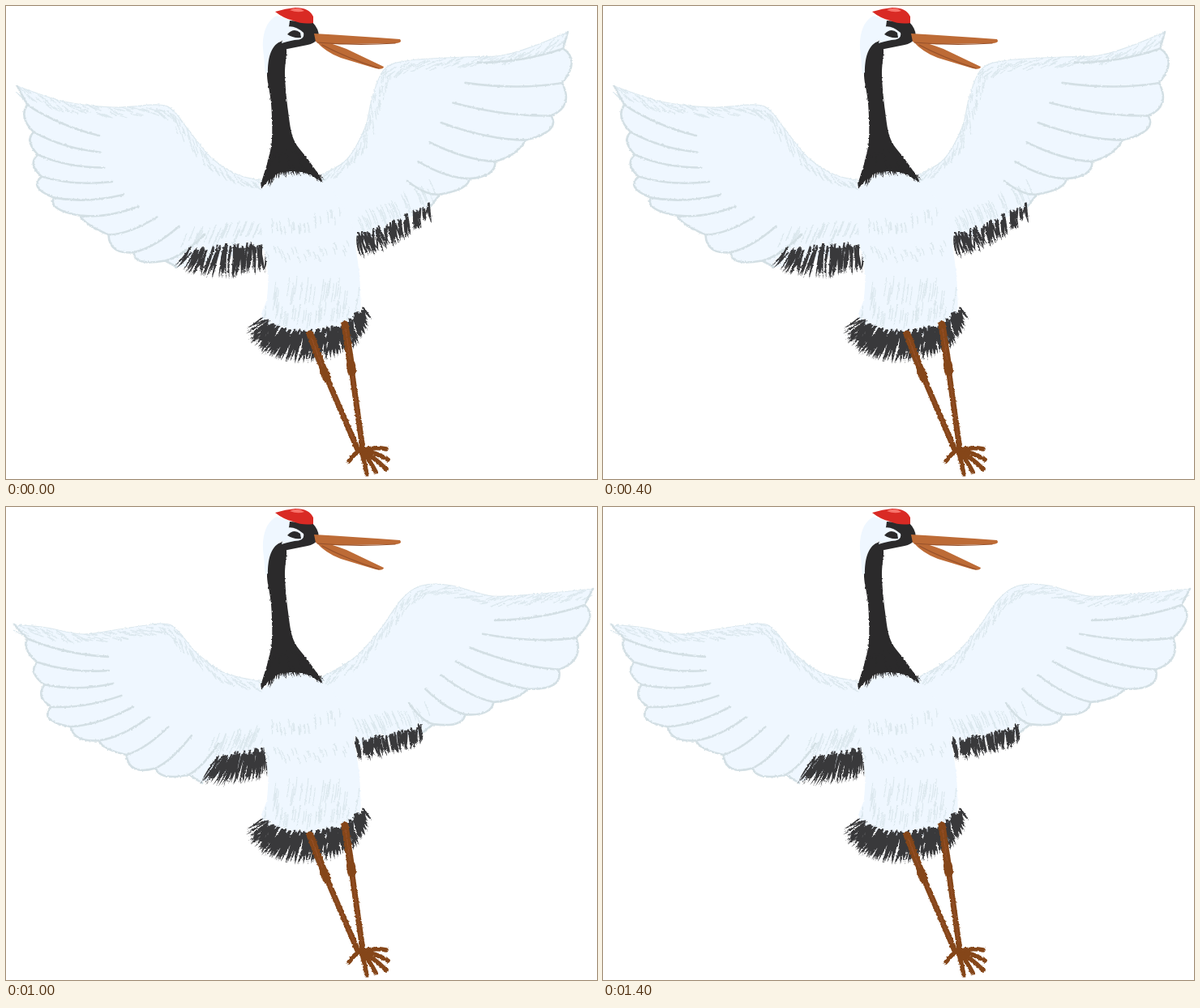
An HTML page that plays this animation: 729 by 584 pixels, repeating every 1.6 s.

```html
<!DOCTYPE html>
<html>
<head>
<meta charset="utf-8">
<title>Crane</title>
<style>
html, body { margin: 0; width: 100%; height: 100%; overflow: hidden; background: #fff; }
svg { display: block; width: 100vw; height: 100vh; }
path { fill: none; stroke-linecap: round; stroke-linejoin: round; }
.white { fill: #eff7ff; }
.line { stroke: #d3dfe4; stroke-width: 2.6; }
.soft { stroke: #dce8ee; stroke-width: 1.2; }
.dark { fill: #39393b; }
.black { fill: #2b2a2b; }
.leg { stroke: #854619; }
.red { fill: #d92a24; }
.pink { fill: #f8736b; }
.beak { fill: #bd6b36; }
.edge { stroke: #96502a; stroke-width: 1.2; }
</style>
</head>
<body>
<svg viewBox="0 0 729 584">
<filter id="rough" filterUnits="userSpaceOnUse" x="0" y="0" width="729" height="584" color-interpolation-filters="sRGB">
  <feTurbulence type="fractalNoise" baseFrequency=".4" seed="4"/>
  <feDisplacementMap in="SourceGraphic" scale="3" xChannelSelector="R" yChannelSelector="G"/>
</filter>
<g filter="url(#rough)">
  <g id="up"></g>
  <g id="down"></g>
  <g id="body"></g>
  <g id="legs"></g>
</g>
<g id="head">
  <path class="white" d="M334 12C321 18 316 35 317 52L320 84L323 82C323 66 326 50 338 44Q346 38 350 30L350 17Z"/>
  <path class="black" d="M350 18L378 20Q386 28 386 38Q382 46 372 48L342 54L336 46Q348 40 350 18Z"/>
  <path class="white" d="M345 26Q356 23 367 33Q369 42 356 42Q346 44 340 46Z"/>
  <path class="black" d="M347 35Q355 26 363 33L364 39Q354 40 347 35Z"/>
  <path class="red" d="M332 7Q345 3 357 2Q374 2 379 13L379 21Q366 23 354 18Q342 15 332 7Z"/>
  <path class="pink" d="M350 5Q360 0 368 6Q360 9 350 5Z"/>
  <path class="beak" d="M382 43Q400 45 420 53L466 75Q465 79 456 77L413 64Q394 57 382 43Z"/>
  <path class="beak" d="M380 34Q430 37 486 41Q490 46 478 46L420 47Q395 48 382 44Z"/>
  <path class="edge" d="M384 45Q430 49 480 46M390 48Q420 64 460 77"/>
</g>
</svg>
<script>
let seed = 7;
const rand = () => (seed = seed * 16807 % 2147483647) / 2147483647;
const jitter = r => (rand() - .5) * 2 * r;
const $ = id => document.getElementById(id);

const points = a => a.flatMap((x, i) => i % 2 ? [] : [[x, a[i + 1]]]);
const mix = (a, b, t) => a.map((v, i) => v + (b[i] - v) * t);
const gap = (a, b) => Math.hypot(b[0] - a[0], b[1] - a[1]);

// Point at t on a Bezier curve of any degree.
function at(curve, t) {
  let p = points(curve);
  while (p.length > 1) p = p.slice(1).map((q, i) => mix(p[i], q, t));
  return p[0];
}

// Smooth line through key points.
function smooth(list, closed) {
  const p = points(list), n = p.length;
  const get = i => closed ? p[(i + n) % n] : p[Math.max(0, Math.min(n - 1, i))];
  let d = 'M' + p[0];
  for (let i = 0; i < (closed ? n : n - 1); i++) {
    const [a, b, c, e] = [-1, 0, 1, 2].map(k => get(i + k));
    d += `C${b.map((v, k) => v + (c[k] - a[k]) / 6)} ${c.map((v, k) => v - (e[k] - b[k]) / 6)} ${c}`;
  }
  return d;
}

// Tapered hairs running from one curve to another.
function fringe(top, bottom, n, w = 2) {
  let d = '';
  for (let i = 0; i < n; i++) {
    const t = (i + rand()) / n;
    const [x, y] = at(top, t).map(v => v + jitter(4));
    const [ex, ey] = at(bottom, t).map(v => v + jitter(4));
    const mx = (x + ex) / 2 + jitter(3), my = (y + ey) / 2 + 3;
    d += `M${x} ${y}Q${mx - w} ${my} ${ex} ${ey}Q${mx + w} ${my} ${x + w} ${y}Z`;
  }
  return d;
}

// Short strokes scattered along a curve.
function hatch(curve, n, dx, dy, spread = 6) {
  let d = '';
  for (let i = 0; i < n; i++) {
    const [x, y] = at(curve, (i + rand()) / n).map(v => v + jitter(spread));
    d += `M${x} ${y}q${dx / 2 + 1} ${dy / 2 - 1} ${dx} ${dy}`;
  }
  return d;
}

function add(parent, cls, d, width) {
  const p = document.createElementNS('http://www.w3.org/2000/svg', 'path');
  p.setAttribute('class', cls);
  p.setAttribute('d', d);
  if (width) p.setAttribute('stroke-width', width);
  $(parent).append(p);
}

// lead: front edge from shoulder to wing tip; tips: feather ends;
// inner: where the feather lines stop; top and hem: bounds of the dark fringe.
function wing(pose, side, { lead, tips, inner, top, hem }) {
  const ends = points(tips), front = points(lead), last = ends.length - 1;
  const edge = smooth(lead);
  let lobes = '', lines = '', shade = '';
  let prev = ends[0];
  for (let i = 0; i < last; i++) {
    const a = ends[i], b = ends[i + 1];
    const stop = at(inner, i / (last - 1)), mid = mix(a, b, .5);
    const notch = mix(mid, stop, Math.min(9, gap(a, b) * .3) / gap(mid, stop));
    const chord = mix(prev, notch, .5);
    lobes += `Q${i ? mix(chord, a, 1.8) : chord} ${notch}`;
    const bend = mix(notch, stop, .45);
    lines += `M${notch}Q${bend[0]} ${bend[1] + 9} ${stop}`;
    prev = notch;
  }
  lobes += `L${ends[last]}`;

  front.slice(1).forEach((b, i) => {
    const a = front[i], len = gap(a, b);
    const [ux, uy] = [(b[0] - a[0]) / len, (b[1] - a[1]) / len];
    for (let s = 0; s < len; s += 2.5) {
      const depth = rand() * 11;
      const x = a[0] + ux * s - side * uy * depth, y = a[1] + uy * s + side * ux * depth;
      shade += `M${x} ${y}l${-ux * 8 - side * uy * 3} ${-uy * 8 + side * ux * 3}`;
    }
  });
  const above = top.map((v, i) => i % 2 ? v - 24 : v);
  shade += hatch(above, 32, 7 * side, 17);

  add(pose, 'white', `${edge}${lobes}L${375 + side * 50} 300Z`);
  add(pose, 'soft', edge + shade);
  add(pose, 'line', `M${ends[0]}${lobes}${lines}`);
  add(pose, 'dark', fringe(top, hem, 58));
}

wing('up', -1, {
  lead: [318, 216, 285, 208, 253, 187, 225, 153, 207, 130, 188, 122, 132, 125, 72, 118, 14, 99],
  tips: [14, 99, 22, 138, 29, 168, 33, 196, 38, 224, 62, 250, 102, 270, 134, 301, 166, 316, 212, 323],
  inner: [115, 160, 110, 245, 245, 282],
  top: [226, 300, 270, 298, 319, 293],
  hem: [211, 323, 265, 344, 320, 326]
});
wing('up', 1, {
  lead: [388, 209, 420, 190, 443, 150, 452, 112, 468, 77, 500, 67, 565, 63, 612, 61, 655, 48, 693, 32],
  tips: [693, 32, 699, 70, 691, 120, 672, 153, 627, 182, 597, 207, 563, 225, 524, 247],
  inner: [582, 70, 535, 145, 495, 216],
  top: [431, 284, 475, 272, 522, 244],
  hem: [440, 310, 480, 297, 524, 264]
});
wing('down', -1, {
  lead: [318, 216, 270, 205, 235, 180, 212, 153, 193, 144, 140, 151, 95, 157, 50, 149, 10, 145],
  tips: [10, 145, 25, 176, 34, 205, 43, 234, 52, 262, 90, 286, 124, 298, 158, 324, 197, 333, 242, 341],
  inner: [126, 185, 120, 255, 262, 292],
  top: [262, 310, 290, 304, 319, 298],
  hem: [240, 341, 285, 346, 320, 330]
});
wing('down', 1, {
  lead: [388, 211, 430, 186, 461, 152, 488, 114, 513, 97, 550, 97, 600, 110, 660, 107, 724, 101],
  tips: [724, 101, 721, 138, 704, 186, 677, 220, 627, 236, 592, 254, 556, 268, 512, 280],
  inner: [603, 140, 560, 190, 497, 242],
  top: [432, 288, 470, 286, 510, 270],
  hem: [437, 312, 475, 308, 513, 290]
});

add('body', 'white', smooth([315, 228, 313, 255, 317, 290, 323, 330, 322, 360, 318, 390, 372, 408,
  430, 392, 437, 350, 430, 290, 422, 258, 391, 216, 350, 203], true));
add('body', 'soft',
  hatch([325, 265, 360, 275, 412, 252], 28, 1, 10) +
  hatch([322, 300, 370, 310, 425, 292], 24, 3, 8) +
  hatch([330, 350, 375, 335, 430, 345], 28, -3, 22, 9) +
  hatch([326, 372, 375, 382, 430, 362], 32, -2, 16, 7));
add('body', 'dark', fringe([318, 386, 335, 412, 425, 407, 437, 374],
  [298, 398, 305, 458, 440, 450, 448, 386], 150, 2.5));
add('body', 'black', smooth([340, 44, 326, 54, 322, 85, 327, 120, 328, 165, 322, 195, 315, 224,
  330, 209, 350, 204, 372, 207, 390, 216, 373, 190, 355, 165, 348, 130, 344, 85, 346, 54], true));
add('body', 'black', fringe([326, 192, 345, 172, 368, 188], [315, 227, 350, 192, 390, 217], 60));

// Each leg: hip, knee, ankle.
for (const [hip, knee, ankle] of [[[375, 405], [394, 455], [434, 548]], [[418, 393], [426, 447], [440, 547]]]) {
  add('legs', 'leg', `M${hip}L${knee}`, 9);
  add('legs', 'leg', `M${knee}L${ankle}`, 7);
  add('legs', 'leg', `M${mix(knee, hip, .08)}L${mix(knee, ankle, .04)}`, 11);
  add('legs', 'edge', `M${mix(hip, knee, .1)}L${mix(hip, knee, .8)}M${mix(knee, ankle, .1)}L${mix(knee, ankle, .9)}`);
}
for (const [x, y] of points([423, 562, 445, 578, 456, 575, 469, 572, 471, 560, 469, 547]))
  add('legs', 'leg', `M438 549Q${(438 + x) / 2} ${(546 + y) / 2 - 3} ${x} ${y}`, 5.5);

function draw(now) {
  const raised = Math.floor(now % 1600 / 200) % 2 === 0;
  $('up').style.display = raised ? '' : 'none';
  $('down').style.display = raised ? 'none' : '';
  requestAnimationFrame(draw);
}
draw(0);
</script>
</body>
</html>
```
